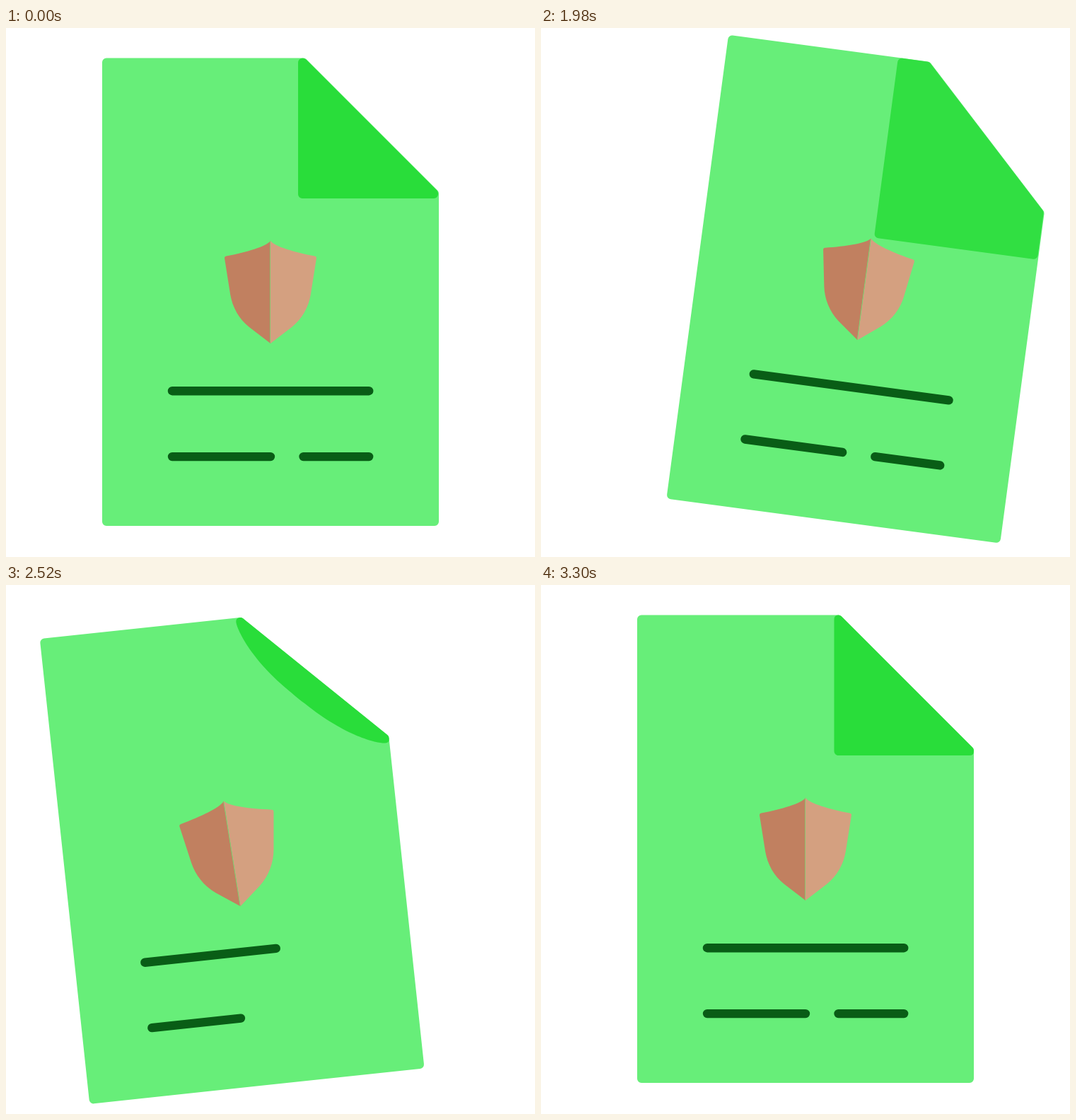
An HTML page with a canvas for the animation above (3.33 s loop, 748 by 748 pixels).

```html
<!DOCTYPE html>
<html lang="en">
<head>
<meta charset="utf-8">
<title>Protected document</title>
<style>
html, body { margin: 0; width: 100%; height: 100%; overflow: hidden; background: #fff; }
canvas { display: block; width: 748px; height: 748px; }
</style>
</head>
<body>
<canvas id="stage" width="748" height="748"></canvas>
<script>
const ctx = document.getElementById('stage').getContext('2d');
const LOOP = 3330, STEP = 30;
const CX = 374, CY = 373.4;
const PAGE = [103, 238, 121], FOLD = [41, 221, 58];
const INK = '#095d16', LIGHT = '#d4a080', DARK = '#c18060';
const TURN = 1902, COVERED = 2253, REDRAW = 2202, FADED = 2500;

const rgb = c => `rgb(${c.map(Math.round).join(',')})`;
const mix = (a, b, p) => a + (b - a) * p;
const ramp = (t, a, b) => Math.min(1, Math.max(0, (t - a) / (b - a)));
const smooth = u => u * u * (3 - 2 * u);
const easeOut = u => u * (2 - u);
const radians = deg => deg * Math.PI / 180;

// Eased moves in turn, each [start, end, value]
const moves = (...list) => t =>
  list.reduce((v, [a, b, to]) => mix(v, to, smooth(ramp(t, a, b))), 0);

// The page swings right, left, a little right, then settles
const shiftX = moves([1500, 1870, 105], [1897, 2270, -68], [2414, 2865, 30], [2880, 3300, 0]);
const shiftY = moves([1500, 1870, -2], [1930, 2090, -11], [2098, 2288, 1],
  [2300, 2520, 6.5], [2550, 2880, -12.8], [2890, 3300, 0]);
const tilt = moves([1500, 1885, 9.1], [1899, 2351, -8.3], [2387, 2905, 5], [2905, 3300, 0]);
const shieldSize = moves([REDRAW, 2550, 1.06], [2560, 2820, .952], [2830, 3150, 1]);
const shieldTilt = moves([2400, 2805, -13.7], [2810, 3200, 0]);

function roundPoly(points, r, fill) {
  const n = points.length, [a, b] = [points[n - 1], points[0]];
  ctx.beginPath();
  ctx.moveTo((a[0] + b[0]) / 2, (a[1] + b[1]) / 2);
  points.forEach((p, i) => ctx.arcTo(...p, ...points[(i + 1) % n], r));
  ctx.closePath();
  ctx.fillStyle = fill;
  ctx.fill();
}

// A rectangle from (x, top) to (right, y) with its upper right corner cut off
function cutSheet(x, y, top, right, cut, fill) {
  roundPoly([[x, y], [x, top], [right - cut, top], [right, top + cut], [right, y]], 6, fill);
}

// The flap that unrolls over the whole page
function flap(t) {
  const p = smooth(ramp(t, TURN, COVERED)), fade = ramp(t, TURN, FADED);
  const color = FOLD.map((c, i) => mix(c, PAGE[i], fade));
  cutSheet(mix(413, 136, p), mix(241, 704, p), 42.7, 611, 188.5, rgb(color));
}

// The new corner, curling out from the cut edge
function curl(p) {
  const q = 1 - p, k = 70 * q, o = 7 * q, e = 3.3 * p;
  const p1 = [mix(500.7, 414.5, p), mix(134.8, 235, p)];
  const p2 = [mix(520.7, 420.5, p), mix(154.8, 241, p)];
  ctx.beginPath();
  ctx.moveTo(414.5, 48.5);
  ctx.quadraticCurveTo(414.5, 42.5, 420.5, 42.5);
  ctx.arcTo(423, 42.5, 612, 231.5, 6);
  ctx.arcTo(612, 231.5, 612, 241, 6);
  ctx.lineTo(612, 235);
  ctx.quadraticCurveTo(612, 241, 606, 241);
  ctx.bezierCurveTo(606 - 10 * q, 241, p2[0] + k, p2[1] + k, ...p2);
  ctx.bezierCurveTo(p2[0] - o - e, p2[1] - o, p1[0] + o, p1[1] + o + e, ...p1);
  ctx.bezierCurveTo(p1[0] - k, p1[1] - k, 414.5, 48.5 + 10 * q, 414.5, 48.5);
  ctx.fillStyle = rgb(FOLD);
  ctx.fill();
}

function shieldHalf(side, fill) {
  ctx.save();
  ctx.scale(side, 1);
  ctx.beginPath();
  ctx.moveTo(0, -72.5);
  ctx.bezierCurveTo(6, -64.5, 34, -56.5, 62.5, -50.8);
  ctx.quadraticCurveTo(65.4, -50.2, 64.9, -47.5);
  ctx.lineTo(56.8, 3.5);
  ctx.bezierCurveTo(54, 20.5, 45, 37.5, 30, 49.5);
  ctx.lineTo(0, 72.5);
  ctx.closePath();
  ctx.fillStyle = fill;
  ctx.fill();
  ctx.restore();
}

function shield(size, angle) {
  if (size <= 0) return;
  ctx.save();
  ctx.translate(CX, CY);
  ctx.rotate(radians(angle));
  ctx.scale(size, size);
  shieldHalf(1, LIGHT);
  shieldHalf(-1, DARK);
  ctx.fillRect(-.6, -71.5, .6, 143);
  ctx.restore();
}

function rule(x0, x1, y, p) {
  if (p <= 0) return;
  ctx.beginPath();
  ctx.moveTo(x0, y);
  ctx.lineTo(mix(x0, x1, p), y);
  ctx.strokeStyle = INK;
  ctx.lineWidth = 12.4;
  ctx.lineCap = 'round';
  ctx.stroke();
}

function rules(a, b, c) {
  rule(235, 513.2, 513.2, a);
  rule(235, 374, 606.1, b);
  rule(420.5, 513.2, 606.1, c);
}

function draw(t) {
  const drawn = (a, b) => easeOut(ramp(t, a, b));
  ctx.fillStyle = '#fff';
  ctx.fillRect(0, 0, 748, 748);
  ctx.save();
  ctx.translate(CX + shiftX(t), CY + shiftY(t));
  ctx.rotate(radians(tilt(t)));
  ctx.translate(-CX, -CY);
  cutSheet(136, 704, 42.5, 612, 189, rgb(PAGE));
  if (t < COVERED) {
    shield(1, 0);
    rules(1, 1, 1);
  }
  if (t < FADED) flap(t);
  if (t > REDRAW) {
    shield(shieldSize(t), shieldTilt(t));
    rules(drawn(REDRAW, 2949), drawn(2220, 2649), drawn(2649, 3043));
  }
  if (t >= 2310) curl(smooth(ramp(t, 2295, 3045)));
  ctx.restore();
}

const start = performance.now();
function tick(now) {
  const t = Math.max(0, now - start) % LOOP;
  draw(Math.floor(t / STEP) * STEP);
  requestAnimationFrame(tick);
}
draw(0);
requestAnimationFrame(tick);
</script>
</body>
</html>
```
